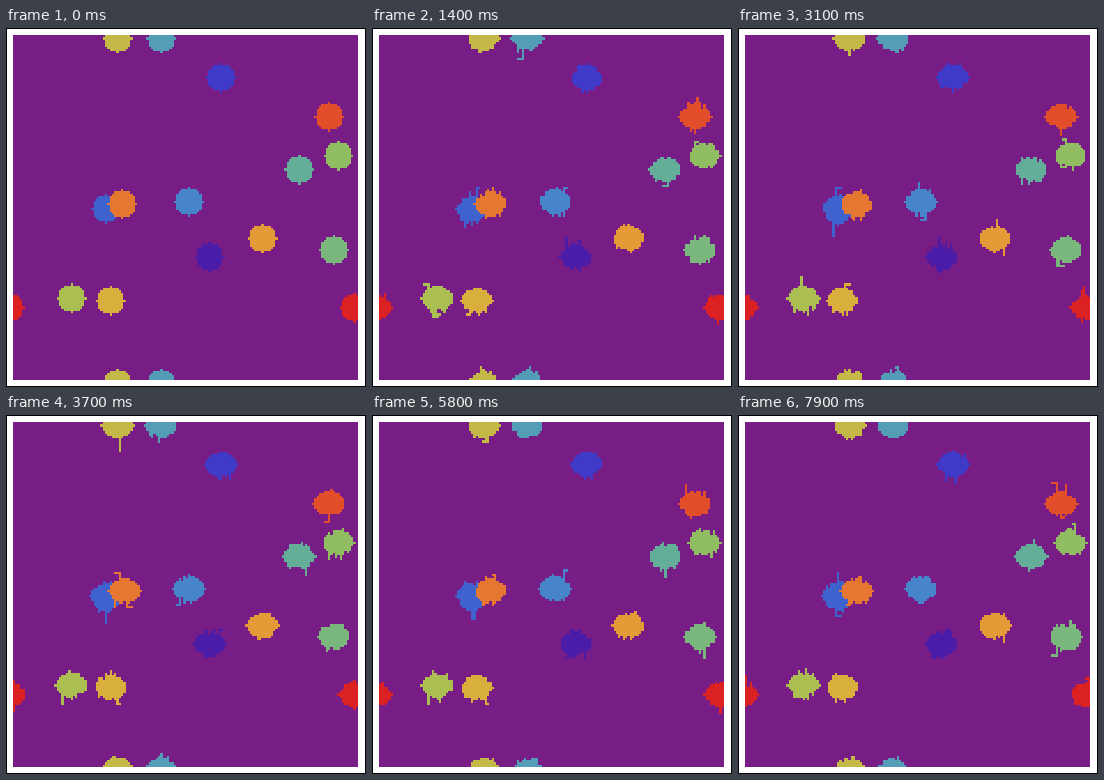
An HTML page with a canvas for the animation above (8 s loop, 360 by 359 pixels).

```html
<!DOCTYPE html>
<html lang="en">
<head>
<meta charset="utf-8">
<title>Cells on a torus</title>
<style>
html, body { margin: 0; width: 100%; height: 100%; overflow: hidden; background: #fff; }
canvas { display: block; width: 360px; height: 359px; }
</style>
</head>
<body>
<canvas id="stage" width="360" height="359"></canvas>
<script>
const ctx = document.getElementById('stage').getContext('2d');
const GRID = 150, SIZE = 2.3, EDGE = 7, STEP = 100, STEPS = 80;

// Half-heights of the columns, counted from the middle of a cell
const DISC = [6, 5, 5, 5, 4, 3, 0, -1];
const WORN = [5, 5, 5, 4, 4, 3, 2, 0];

const cells = [
  { x: 85, y: 96, color: '#4b1ca8' },
  { x: 90, y: 18, color: '#3f3bc8' },
  { x: 40, y: 75, color: '#3e63cf', squeezed: true },
  { x: 76, y: 72, color: '#4785cb' },
  { x: 64, y: 1, color: '#539eb6' },
  { x: 124, y: 58, color: '#64ad99' },
  { x: 139, y: 93, color: '#79b77d' },
  { x: 141, y: 52, color: '#91bd62' },
  { x: 25, y: 114, color: '#abbe51' },
  { x: 45, y: 1, color: '#c4b946' },
  { x: 42, y: 115, color: '#d8ae3d' },
  { x: 108, y: 88, color: '#e39a37' },
  { x: 47, y: 73, color: '#e67731', drift: 1 },
  { x: 137, y: 35, color: '#e24e29' },
  { x: 148, y: 118, color: '#db2122' }
];

function hash(...keys) {
  let h = 2166136261;
  for (const k of keys) {
    h = Math.imul(h ^ (k + 1013), 16777619);
    h = Math.imul(h ^ (h >>> 15), 2246822507);
  }
  h ^= h >>> 13;
  return (h >>> 0) / 4294967296;
}

function dot(x, y) {
  x = (x + GRID) % GRID;
  y = (y + GRID) % GRID;
  const left = Math.round(EDGE + x * SIZE), top = Math.round(EDGE + y * SIZE);
  ctx.fillRect(left, top,
    Math.round(EDGE + (x + 1) * SIZE) - left,
    Math.round(EDGE + (y + 1) * SIZE) - top);
}

// Distance from the middle row to the rim of one column, above or below
function reach(cell, id, dx, side, step) {
  const col = Math.abs(dx), mix = Math.min(1, step / 6);
  let h = Math.round(DISC[col] + (WORN[col] - DISC[col]) * mix);
  if (step === 0) return h;
  const r = hash(id, dx + 8, side + 2, Math.floor((step + id) / 3));
  if (r < 0.2) h--;
  else if (r > 0.92 && col < 6) h++;
  if (cell.squeezed && side > 0 && col < 6) h += Math.round(mix);
  return h;
}

function drawTendril(cell, id, slot, cx, step) {
  const life = 5 + slot % 2;
  const age = step + id * 3 + slot * 2;
  const epoch = Math.floor(age / life);
  const r = n => hash(id, slot + 40, epoch, n);
  const side = r(1) < 0.5 ? -1 : 1;
  const dx = cell.squeezed ? Math.floor(r(2) * 6) - 3 : Math.floor(r(2) * 9) - 4;
  const longest = 1 + r(3) * r(7) * (cell.squeezed ? 6 : 4);
  const swell = Math.sin(Math.PI * (age % life + 0.5) / life);
  const length = Math.round(longest * swell * Math.min(1, step / 6));
  if (length < 1) return;

  const tip = reach(cell, id, dx, side, step) + length;
  for (let k = 0; k < length; k++) dot(cx + dx, cell.y + side * (tip - k));
  if (length > 1 && r(4) > 0.65) {
    const way = r(5) < 0.5 ? -1 : 1, bend = r(6) > 0.6 ? 2 : 1;
    for (let k = 1; k <= bend; k++) dot(cx + dx + way * k, cell.y + side * tip);
  }
}

function drawCell(cell, id, step) {
  const cx = cell.x + (step > 5 ? cell.drift || 0 : 0);
  ctx.fillStyle = cell.color;
  for (let dx = -7; dx <= 7; dx++) {
    const up = reach(cell, id, dx, -1, step);
    const down = reach(cell, id, dx, 1, step);
    for (let dy = -up; dy <= down; dy++) dot(cx + dx, cell.y + dy);
  }
  const slots = cell.squeezed ? 7 : 5;
  for (let s = 0; s < slots; s++) drawTendril(cell, id, s, cx, step);
}

function draw(step) {
  ctx.fillStyle = '#000';
  ctx.fillRect(0, 0, 360, 359);
  ctx.fillStyle = '#fff';
  ctx.fillRect(1, 1, 358, 357);
  ctx.fillStyle = '#781c86';
  ctx.fillRect(EDGE, EDGE, GRID * SIZE, GRID * SIZE);
  cells.forEach((cell, id) => drawCell(cell, id, step));
}

const start = performance.now();
let shown = -1;
function tick() {
  const step = Math.floor((performance.now() - start) / STEP) % STEPS;
  if (step !== shown) draw(shown = step);
  requestAnimationFrame(tick);
}
tick();
</script>
</body>
</html>
```
